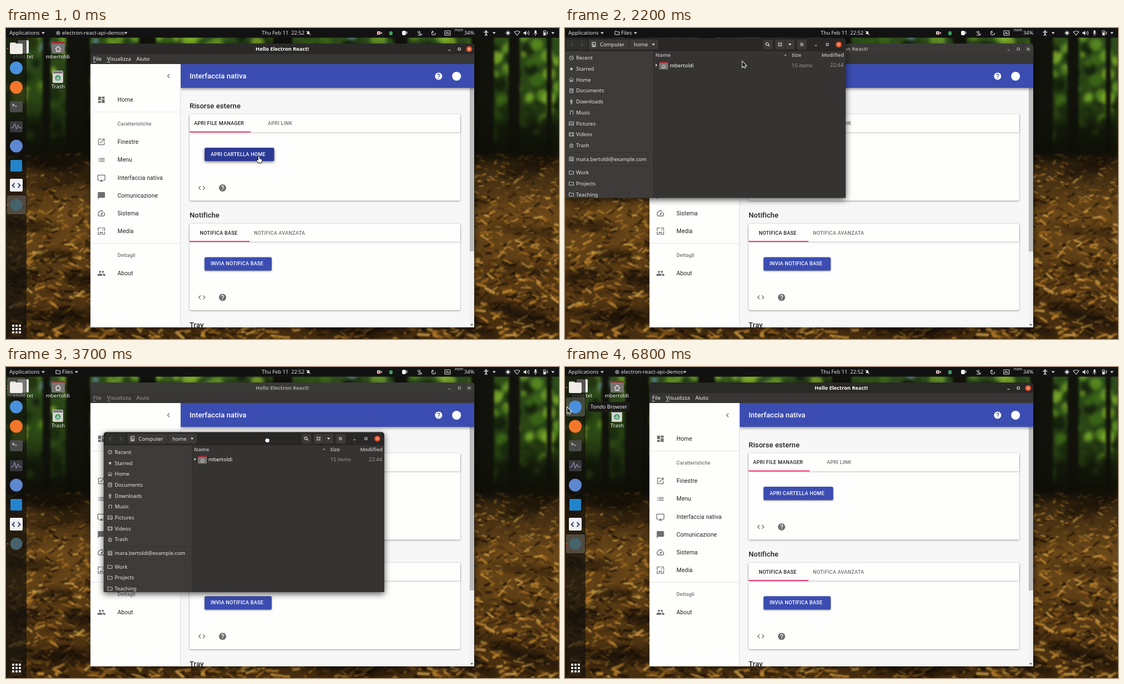
An HTML page with a canvas that plays this animation: 997x561 px, repeating every 6.9 s.

```html
<!DOCTYPE html>
<html lang="en">
<head>
<meta charset="utf-8">
<title>Desktop demo</title>
<style>
html, body { margin: 0; width: 100%; height: 100%; overflow: hidden; background: #000 }
canvas { display: block }
</style>
</head>
<body>
<canvas id="stage" width="997" height="561"></canvas>
<script>
const W = 997, H = 561, LOOP = 6900, STEP = 100;
const UI = '"Noto Sans", "Open Sans", sans-serif', APP = 'Roboto, sans-serif';
const OPEN = 1000, CLOSE = 5200;
const USER = 'mbertoldi';
const g = document.getElementById('stage').getContext('2d');

// ---- helpers ----
const clamp = v => Math.max(0, Math.min(1, v));
const lerp = (a, b, k) => a + (b - a) * k;

function track(keys, t) {
  let i = 0;
  while (i < keys.length - 2 && t >= keys[i + 1][0]) i++;
  const [a, b] = [keys[i], keys[i + 1]];
  const k = clamp((t - a[0]) / (b[0] - a[0]));
  return [lerp(a[1], b[1], k), lerp(a[2], b[2], k)];
}

function text(s, x, y, size, color, weight = 400, font = UI, align = 'left', spacing = 0) {
  g.font = `${weight} ${size}px ${font}`;
  g.letterSpacing = spacing * size + 'px';
  g.textAlign = align;
  g.fillStyle = color;
  g.fillText(s, x, y + size * .36);
}

function rect(x, y, w, h, color, r = 0, ctx = g) {
  ctx.fillStyle = color;
  ctx.beginPath();
  ctx.roundRect(x, y, w, h, r);
  ctx.fill();
}

function circle(x, y, r, color, ctx = g) {
  ctx.fillStyle = color;
  ctx.beginPath();
  ctx.arc(x, y, r, 0, 7);
  ctx.fill();
}

function shadow(blur, dy, alpha, draw) {
  g.save();
  g.shadowColor = `rgba(0,0,0,${alpha})`;
  g.shadowBlur = blur;
  g.shadowOffsetY = dy;
  draw();
  g.restore();
}

function path(d, x, y, color, width = 0, scale = 1) {
  g.save();
  g.translate(x, y);
  g.scale(scale, scale);
  const p = new Path2D(d);
  if (width) {
    g.strokeStyle = color;
    g.lineWidth = width;
    g.stroke(p);
  } else {
    g.fillStyle = color;
    g.fill(p);
  }
  g.restore();
}

const down = (x, y, color, s = 1) => path('M-3-1.5H3L0 2Z', x, y, color, 0, s);

// 24-unit icons, drawn around their centre
function icon(d, x, y, color = '#6f6f6f') {
  path(d, x - 7.8, y - 7.8, color, 0, .648);
}

// ---- wallpaper: soft forest above a sunlit floor of leaves ----
let seed = 11;
const rnd = () => (seed = seed * 16807 % 2147483647) / 2147483647;
const pick = list => list[Math.floor(rnd() * list.length)];

function newLayer() {
  const c = document.createElement('canvas');
  c.width = W;
  c.height = H;
  return c;
}

function makeWallpaper() {
  const out = newLayer(), o = out.getContext('2d');
  const layer = (blur, draw) => {
    const c = newLayer();
    draw(c.getContext('2d'));
    o.filter = `blur(${blur}px)`;
    o.drawImage(c, 0, 0);
    o.filter = 'none';
  };
  const base = o.createLinearGradient(0, 0, 0, H);
  [[0, '#30501d'], [.25, '#263c12'], [.38, '#171a0c'], [.43, '#33240f'], [.6, '#6b4819'], [1, '#452d10']]
    .forEach(s => base.addColorStop(...s));
  o.fillStyle = base;
  o.fillRect(0, 0, W, H);

  layer(3, c => {
    for (let i = 0; i < 520; i++) {
      const y = rnd() * 200;
      const colors = ['#3d6b17', '#5f9420', '#18290e', '#101a0a', '#2a4a14'];
      if (y < 130) colors.push('#86b52c', '#6ea329');
      if (y < 100) colors.push('#6f9fc4');
      c.globalAlpha = .8;
      circle(rnd() * W, y, 4 + rnd() * 11, pick(colors), c);
    }
  });
  layer(2, c => {
    for (const [x, w] of [[66, 14], [108, 44], [240, 30], [480, 36], [700, 24], [838, 42], [906, 20], [975, 9]])
      rect(x, 0, w, 222, '#11120b', 0, c);
  });
  layer(8, c => rect(-20, 165, W + 40, 60, 'rgba(15,18,9,.75)', 0, c));
  layer(.8, c => {
    const colors = ['#c98d30', '#a66d21', '#7b4f19', '#4c300f', '#24170a', '#1a1007', '#dcab4d'];
    for (let i = 0; i < 4200; i++) {
      const d = rnd(), y = 228 + d * 335;
      c.save();
      c.translate(rnd() * W, y);
      c.rotate((rnd() - .5) * 1.6);
      c.globalAlpha = .75;
      rect(0, 0, 5 + rnd() * (6 + d * 14), 1 + rnd() * (1.5 + d * 4), pick(colors), 1, c);
      c.restore();
    }
  });
  layer(7, c => {
    c.fillStyle = 'rgba(14,9,4,.6)';
    for (let i = 0; i < 42; i++) {
      c.beginPath();
      c.ellipse(rnd() * W, 230 + rnd() * 340, 30 + rnd() * 60, 4 + rnd() * 11, (rnd() - .5) * .5, 0, 7);
      c.fill();
    }
    rect(0, 215, W, 24, 'rgba(14,12,6,.7)', 0, c);
  });
  return out;
}
const wallpaper = makeWallpaper();

// ---- desktop ----
function homeFolder(x, y, s) {
  rect(x - 12 * s, y - 10 * s, 24 * s, 7 * s, '#a32632', 2 * s);
  rect(x - 12 * s, y - 7 * s, 24 * s, 18 * s, '#777573', 2 * s);
  path('M-5 1L0-4 5 1M-3 1V5H3V1', x, y + 2 * s, '#eee', 1.3, s);
}

function desktop() {
  g.drawImage(wallpaper, 0, 0);
  rect(21, 22, 20, 24, '#efeeec', 2);
  path('M-5-5H5M-5-1H5M-5 3H2', 31, 34, '#bbb', 1);
  homeFolder(94, 35, 1);
  rect(84, 77, 19, 22, '#d5d4d0', 2);
  rect(85, 78, 17, 4, '#777', 1);
  circle(93.5, 90, 5, '#3c9a63');
  path('M-2.5 2L0-2.5 2.5 2Z', 93.5, 90, '#fff', 1);
  shadow(2, 1, .9, () => {
    text('kfold.txt', 31, 51.5, 9.4, '#fff', 400, UI, 'center');
    text(USER, 93.5, 51.5, 9.4, '#fff', 400, UI, 'center');
    text('Trash', 94, 106, 9.4, '#fff', 400, UI, 'center');
  });
}

function topBar(filesActive) {
  const c = '#e2e2e2';
  rect(0, 0, W, 17.5, '#131212');
  text('Applications', 6, 9, 9.5, c);
  down(67, 9, c);
  if (filesActive) {
    path('M-4-3H-1L0-2H4V3H-4Z', 94, 9, c, 1);
    text('Files', 101, 9, 9.5, c);
    down(127, 9, c);
  } else {
    circle(94, 9, 3.8, '#777');
    text('electron-react-api-demos', 101, 9, 9.5, c);
    down(216, 9, c);
  }
  text('Thu Feb 11  22:52', 461, 9, 9.4, c);
  path('M-3 2H3L2 0V-2Q0-5-2-2V0ZM-1 4H1', 545, 9, c);
  path('M-4-4L4 4', 545, 9, c, 1);
  rect(669, 6, 6, 6, '#d9d0cd', 1);
  path('M0 0L3-2V2Z', 675, 9, '#d9d0cd');
  circle(672, 9, 1.5, '#d33');
  rect(691, 6, 6, 7, '#40a060', 2);
  rect(714, 5, 7, 8, '#eee', 2.5);
  path('M3-2H5V1H3', 718, 9, '#eee', 1);
  path('M-4-3Q0 4 4 2M-1-4L1 0M-4 4H3', 746, 9, c, 1.2);
  path('M3.5 0A3.5 3.5 0 1 1 0-3.5M0 0L-2-2', 771, 9, c, 1.1);
  path('M-5-4H5V4H-5ZM-4 1H-2L-1-2 1 2 2 0H4', 796, 9, c, 1);
  text('mem', 809, 4, 6.3, c);
  text('34%', 826, 9, 9.4, c);
  circle(865.5, 5.5, 1.4, c);
  path('M-4-1.5H4M0-1V1L-2 5M0 1L2 5', 865.5, 9, c, 1.4);
  down(880, 9, c);
  circle(905, 9, 2.5, c);
  path('M0-5V5M-5 0H5M-3.5-3.5L3.5 3.5M3.5-3.5L-3.5 3.5', 905, 9, c, .8);
  path('M-5-2Q0-5 5-2L0 4Z', 921.5, 9, c, 1.1);
  path('M-5-1.5H-3L0-4V4L-3 1.5H-5Z', 938, 9, c);
  path('M2-2Q4 0 2 2M4-4Q7 0 4 4', 938, 9, c, 1);
  rect(953, 4, 3.4, 6, c, 1.7);
  path('M-3 0Q0 5 3 0M0 3V5', 954.7, 9, c, 1);
  path('M-2-4H2V4H-2Z', 971, 9, c, 1);
  rect(969.5, 8, 3, 5, c);
  path('M1-3L-1 0H1L-1 3', 976, 9, c, 1);
  down(986, 9, c);
}

function dock(shift, filesActive, hover, filesOpen) {
  g.save();
  g.translate(-38 * shift, 0);
  rect(0, 17.5, 37, 544, 'rgba(17,15,12,.68)');
  const tile = y => rect(2, y - 17, 34, 34, 'rgba(255,255,255,.2)', 3);
  tile(filesActive ? 36 : 319);
  if (hover) tile(72);
  for (const y of filesOpen ? [34, 39, 319] : [37, 319]) circle(3, y, 1.2, '#e95420');

  rect(7, 26, 11, 8, '#d5d0c9', 2);
  rect(7, 28, 23, 19, '#f0ede8', 2);
  circle(18.5, 72, 11.5, '#4a90dc');
  circle(18.5, 107, 11.5, '#f4762a');
  rect(7, 132, 23, 20, '#4a4a49', 2);
  path('M-7-5L-4-3-7-1M-3-1H1', 18.5, 142, '#eee', 1.2);
  rect(7, 168, 23, 20, '#38383b', 2);
  path('M-10 2H-6L-3-6 0 5 3-3 5 2H10', 18.5, 178, '#9fa6cf', 1);
  circle(18.5, 213, 11.5, '#5d87cf');
  rect(8, 238, 21, 21, '#2384cb', 2);
  rect(7, 272, 23, 23, '#f1f1f4', 2);
  path('M-3-4L-7 0-3 4M3-4L7 0 3 4', 18.5, 284, '#3b416d', 2);
  circle(18.5, 319, 11, '#46626b');
  for (let i = 0; i < 9; i++) rect(11 + i % 3 * 6, 535 + Math.floor(i / 3) * 6, 4, 4, '#eee', 1);
  g.restore();
}

// ---- demo application ----
const HELP = 'M12 2C6.5 2 2 6.5 2 12s4.5 10 10 10 10-4.5 10-10S17.500 2 12 2zm1 17h-2v-2h2v2zm2.070-7.750l-.9.92C13.450 12.900 13 13.500 13 15h-2v-.5c0-1.100.45-2.100 1.170-2.830l1.240-1.260c.37-.36.59-.86.59-1.410 0-1.100-.9-2-2-2s-2 .9-2 2H8c0-2.210 1.790-4 4-4s4 1.790 4 4c0 .88-.36 1.680-.93 2.250z';
const CODE = 'M9.4 16.6L4.8 12l4.6-4.6L8 6l-6 6 6 6zm5.2 0l4.6-4.6-4.6-4.6L16 6l6 6-6 6z';
const MENU = [
  ['Home', 129, 'M3 13h8V3H3zm0 8h8v-6H3zm10 0h8V11h-8zm0-18v6h8V3z'],
  ['Finestre', 205, 'M19 19H5V5h7V3H5q-2 0-2 2v14q0 2 2 2h14q2 0 2-2v-7h-2zM14 3v2h3.6l-9.8 9.8 1.4 1.4L19 6.400V10h2V3z'],
  ['Menu', 237.5, 'M3 13h2v-2H3zm0 4h2v-2H3zm0-8h2V7H3zm4 4h14v-2H7zm0 4h14v-2H7zM7 7v2h14V7z'],
  ['Interfaccia nativa', 270, 'M6 22h12l-6-6zM21 3H3q-2 0-2 2v12q0 2 2 2h4v-2H3V5h18v12h-4v2h4q2 0 2-2V5q0-2-2-2z'],
  ['Comunicazione', 302, 'M20 2H4q-2 0-2 2v18l4-4h14q2 0 2-2V4q0-2-2-2z'],
  ['Sistema', 334, 'M20.400 8.600l-1.250 1.850a8 8 0 0 1-.22 7.550H5.070A8 8 0 0 1 15.600 6.850l1.850-1.230A10 10 0 0 0 3.350 19q.6 1 1.720 1h13.850q1.200 0 1.740-1a10 10 0 0 0-.27-10.400zm-9.800 6.800a2 2 0 0 0 2.830 0l5.660-8.490-8.490 5.660a2 2 0 0 0 0 2.830z'],
  ['Media', 366, 'M4 4h7V2H4q-2 0-2 2v7h2zm6 9l-4 5h12l-3-4-2 2.700zM15.500 7a1.500 1.500 0 1 0 .1 0zM20 2h-7v2h7v7h2V4q0-2-2-2zm0 18h-7v2h7q2 0 2-2v-7h-2zM4 13H2v7q0 2 2 2h7v-2H4z'],
  ['About', 442, 'M16 5a3 3 0 1 0 .1 0zM8 5a3 3 0 1 0 .1 0zM8 13c-2.300 0-7 1.200-7 3.500V19h14v-2.500c0-2.300-4.700-3.500-7-3.500zm8 0h-1q2 1.400 2 3.500V19h6v-2.500c0-2.300-4.700-3.500-7-3.500z']
];

function card(y, title, tabs, underline, label, width, hover) {
  const heading = y - 15.5;
  text(title, 331, heading, 12.96, '#212121', 500, APP, 'left', .0075);
  shadow(3, 1, .4, () => rect(331, y, 488, 156, '#fefefd', 2.5));
  shadow(3, 1, .25, () => rect(331, y, 488, 32.5, '#fefefd', 2.5));
  tabs.forEach(([s, x], i) =>
    text(s, x, y + 16.5, 9.07, i ? '#717171' : '#222', 500, APP, 'left', .02857));
  rect(331, y + 31.2, underline, 1.6, '#f50057');
  shadow(hover ? 5 : 3, hover ? 2 : 1, .5, () =>
    rect(358, y + 60.5, width, 24, hover ? '#2c3a96' : '#3b4db1', 2.6));
  text(label, 369, y + 72, 9.07, '#fff', 500, APP, 'left', .02857);
  icon(CODE, 353, y + 133);
  icon(HELP, 390.5, y + 133);
}

function titleButtons(x, y, gap, active, color) {
  path('M-2 2H2', x - 2 * gap, y, color, 1);
  path('M-2-2H2V2H-2Z', x - gap, y, color, 1);
  circle(x, y, 5.3, active ? '#e9552b' : '#4a4a49');
  path('M-2-2L2 2M2-2L-2 2', x, y, active ? '#fff' : '#ccc', 1);
}

function appWindow(active, hover) {
  const ink = active ? '#fff' : '#a3a2a0';
  shadow(12, 3, .6, () => rect(152.5, 28, 692, 512, '#373635', [5, 5, 0, 0]));
  rect(152.5, 28, 692, 19, active ? '#2a2928' : '#3a3938', [5, 5, 0, 0]);
  text('Hello Electron React!', 498, 38, 9.3, ink, 700, UI, 'center');
  titleButtons(835, 38, 17.7, active, active ? '#fff' : '#bbb');
  for (const [s, x, w] of [['File', 157, 5], ['Visualizza', 182, 6], ['Aiuto', 235, 0]]) {
    text(s, x, 56, 9.6, active ? '#f2f2f2' : '#9d9c9a');
    rect(x, 61, w, .8, ink);
  }
  g.save();
  g.beginPath();
  g.rect(152.5, 65, 691.5, 475);
  g.clip();
  rect(152, 65, 693, 475, '#f8f7f7');
  card(155.5, 'Risorse esterne', [['APRI FILE MANAGER', 339], ['APRI LINK', 472]], 110, 'APRI CARTELLA HOME', 125.5, hover);
  card(353, 'Notifiche', [['NOTIFICA BASE', 349.5], ['NOTIFICA AVANZATA', 447]], 108, 'INVIA NOTIFICA BASE', 121, false);
  text('Tray', 331, 535, 12.96, '#212121', 500, APP, 'left', .0075);

  rect(835.5, 108, 8.5, 432, '#f1f1f1');
  rect(836, 108, 8, 295, '#bdbdbd');
  down(839.8, 535.5, '#444', .8);
  shadow(5, 2, .45, () => rect(315, 65, 530, 43, '#3b4db1'));
  text('Interfaccia nativa', 331, 86, 12.96, '#fff', 500, APP, 'left', .0075);
  icon(HELP, 780, 87, '#fff');
  circle(812.3, 87, 8, '#fff');

  rect(152, 65, 162.5, 475, '#fefefd');
  rect(314, 65, 1, 475, '#dedede');
  rect(152, 151, 162, 1, '#e3e3e3');
  rect(152, 388, 162, 1, '#e3e3e3');
  icon('M15.4 7.4L14 6l-6 6 6 6 1.4-1.4L10.8 12z', 293, 87);
  for (const [s, y, d] of MENU) {
    icon(d, 172, y + .5);
    text(s, 201, y, 10.37, '#212121', 400, APP, 'left', .00938);
  }
  text('Caratteristiche', 201, 173, 9.07, '#757575', 500, APP, 'left', .01);
  text('Dettagli', 201, 410, 9.07, '#757575', 500, APP, 'left', .01);
  g.restore();
}

// ---- file manager ----
const FOLDER = 'M-4-3H-1L0-2H4V3H-4Z';
const PLACES = [
  ['Recent', 'M3.5 0A3.5 3.5 0 1 1 0-3.5A3.5 3.5 0 0 1 3.500 0M0-2V0H2'],
  ['Starred', 'M0-3L1-1H3L1.500.5 2 3 0 1.500-2 3-1.500.5-3-1H-1Z'],
  ['Home', 'M-4 0L0-3.500 4 0M-2.500 0V3.500H-1V1H1V3.500H2.500V0'],
  ['Documents', 'M-3-3.500H3V3.500H-3ZM-1.500-1.500H2M-1.500.5H2'],
  ['Downloads', 'M0-4V2M-1.500-3V1L0 3 1.500 1V-3M-2 4H2'],
  ['Music', 'M-2 2.500V-3H3V2M-3 3H-1.500M1.500 2.500H3'],
  ['Pictures', 'M-4-3H4V3H-4ZM-3 2L-1-1 1 1 2 0 3 2'],
  ['Videos', 'M-4-3H4V3H-4ZM-2-3V3M2-3V3'],
  ['Trash', 'M-3.500-1H3.500M-2.500-1V3.500H2.500V-1M-1.500-3H1.500M0 1V3'],
  ['mara.bertoldi@example.com', 'M-3.500-3.500H3.500V3.500H-3.500ZM-3.500-1H3.500M-3.500 1.500H3.500'],
  ['Work', FOLDER], ['Projects', FOLDER], ['Teaching', FOLDER]
];

function filesWindow(x, y, shown) {
  const w = 506, h = 288.5, c = '#e6e5e3', dim = '#aaa9a7';
  g.save();
  g.globalAlpha = shown;
  const s = lerp(.9, 1, shown);
  g.translate(x + w / 2 * (1 - s), y + h / 2 * (1 - s));
  g.scale(s, s);
  shadow(12, 3, .7, () => rect(0, 0, w, h, '#353433', [5, 5, 0, 0]));
  g.beginPath();
  g.roundRect(0, 0, w, h, [5, 5, 0, 0]);
  g.clip();
  rect(0, 0, w, 24, '#292827');
  rect(0, 24, 159, h, '#3d3c3b');
  rect(159, 24, 1, h, '#2c2b2a');
  for (const [bx, bw] of [[3, 37], [43, 125], [357, 17.5], [379, 35], [418.5, 17.5]])
    rect(bx, 3, bw, 17.5, bx === 3 ? '#30302f' : '#3b3a39', 2.5);
  for (const bx of [21.5, 115.5, 396.5]) rect(bx, 3, 1, 17.5, '#292827');
  path('M1.500-3L-1.500 0 1.500 3', 12, 11.7, '#777', 1);
  path('M-1.500-3L1.500 0-1.500 3', 31, 11.7, '#777', 1);
  path('M-3-4H3V4H-3ZM1.500 0A1.500 1.500 0 1 1 0-1.500M-2 3H2', 52, 11.7, c, 1);
  text('Computer', 63, 11.7, 9.4, c, 500);
  text('home', 124, 11.7, 9.4, c, 500);
  down(159.5, 11.7, c, .9);
  path('M2 0A2.500 2.500 0 1 1 .5-2.500A2.500 2.500 0 0 1 2 0M1.500 1L4 4', 365, 11.2, c, 1.1);
  path('M-3-3H-1V-1H-3ZM1-3H3V-1H1ZM-3 1H-1V3H-3ZM1 1H3V3H1Z', 387.5, 11.7, c, .8);
  down(405.5, 11.7, c, .9);
  path('M-3-2H3M-3 0H3M-3 2H3', 427, 11.7, c, .9);
  titleButtons(493.5, 11.7, 20.6, true, c);

  text('Name', 163, 30.7, 9.2, dim, 700);
  path('M-3 1.500H3L0-1.500Z', 397.5, 30.5, dim, 0, .8);
  text('Size', 408.5, 30.7, 9.2, dim, 700);
  text('Modified', 503, 30.7, 9.2, dim, 700, UI, 'right');
  path('M-1.500-2.500V2.500L1.500 0Z', 165, 49, c);
  homeFolder(178, 49.5, .66);
  text(USER, 189, 49.3, 9.35, '#fff');
  text('15 items', 446, 49.3, 9.35, '#9b9a98', 400, UI, 'right');
  text('22:44', 502, 49, 9.35, '#9b9a98', 400, UI, 'right');

  PLACES.forEach(([name, d], i) => {
    const py = 36 + i * 19.7 + (i > 8 ? 5 : 0) + (i > 9 ? 4.8 : 0);
    path(d, 11.5, py, '#d5d4d2', i === 1 ? 0 : .9);
    text(name, 20, py, 9.35, c);
  });
  rect(0, 206, 159, 1, '#353433');
  rect(0, 230.5, 159, 1, '#353433');
  g.restore();
}

// ---- pointer ----
function pointer(kind, x, y) {
  const shape = {
    arrow: 'M0 0V10L2.3 7.8 4 11.300 5.600 10.500 4 7.200H7Z',
    hand: 'M-1 0Q.5-1 1 1V4L5 5Q6 6 5 9L4 11H-1L-4 7Q-3 5-1 7Z',
    grab: 'M-3-2Q-1-4 0-2.500 2-3.500 3-2 4-2 4 0L3 4H-2L-4 1Z'
  }[kind];
  path(shape, x, y, kind === 'arrow' ? '#fff' : '#111', 1.8);
  path(shape, x, y, kind === 'arrow' ? '#1b1b1b' : '#fff');
}

const WINDOW_KEYS = [[2500, 0, 18], [2800, 30, 26], [3700, 176, 117.5], [4200, 225, 130.5]];
const POINTER_KEYS = [
  [0, 456, 232], [1600, 456, 232], [2300, 297, 32], [2500, 297, 32], [2800, 327, 41],
  [3700, 471, 132], [4200, 521, 145], [4400, 521, 145], [5000, 716.5, 146.5],
  [5400, 716.5, 146.5], [5900, 644, 137], [6500, 4, 73]
];

function draw(t) {
  const filesActive = t >= OPEN && t < CLOSE;
  const shown = t < CLOSE ? clamp((t - OPEN + 100) / 300) : clamp(1 - (t - CLOSE + 100) / 200);
  const hidden = t < 2900 ? clamp((t - OPEN) / 200) : clamp(1 - (t - 2900) / 200);
  const overDock = t >= 6500;

  desktop();
  appWindow(!filesActive, t < OPEN);
  dock(hidden, filesActive, overDock, filesActive);
  if (t >= OPEN && shown > 0) filesWindow(...track(WINDOW_KEYS, t), shown);
  topBar(filesActive);
  if (t >= 6700) {
    rect(41, 63, 76, 18, 'rgba(26,25,24,.94)', 4);
    text('Tondo Browser', 79, 72, 9.4, '#f0f0f0', 400, UI, 'center');
  }
  const kind = t < OPEN ? 'hand' : t >= 2500 && t < 4300 ? 'grab' : 'arrow';
  pointer(kind, ...track(POINTER_KEYS, t));
}

function frame() {
  draw(Math.floor(performance.now() % LOOP / STEP) * STEP);
  requestAnimationFrame(frame);
}
frame();
</script>
</body>
</html>
```
